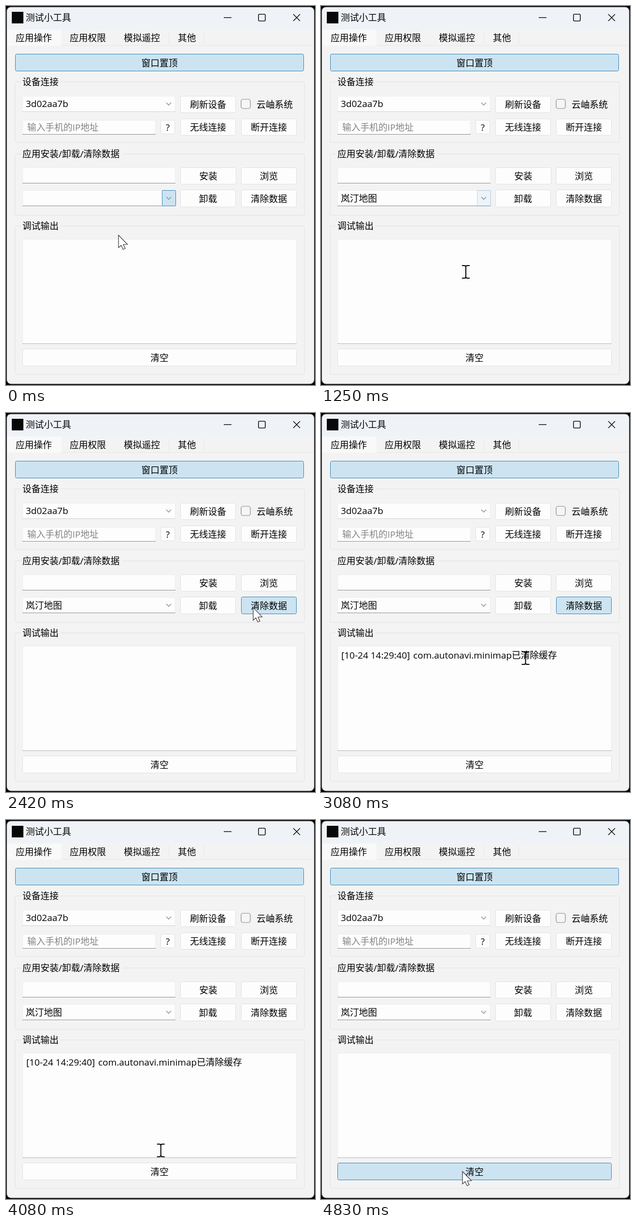
Animation of 640 by 784 pixels, one loop 4910 ms. Source, as an HTML page:

```html
<!DOCTYPE html>
<html lang="zh-CN">
<head>
<meta charset="utf-8">
<title>测试小工具</title>
<style>
  html, body { margin: 0; width: 100%; height: 100%; overflow: hidden; background: #000; }
  svg { display: block; width: 640px; height: 784px; }
  text { font: 18.75px "Open Sans", "Noto Sans CJK SC", "Noto Sans CJK", sans-serif; fill: #000; }
  .latin { font-size: 19px; }
  .mid { text-anchor: middle; }
  .hint { fill: #838383; }
  .line { fill: none; stroke: #111; stroke-width: 1.6; }
  .arrow { fill: none; stroke: #858585; stroke-width: 1.3; }
</style>
</head>
<body>
<svg id="stage" viewBox="0 0 640 784">
  <rect x="1.5" y="2" width="637" height="780" rx="9" fill="#f3f3f3"/>
  <path d="M1.5 48V11q0-9 9-9H629.5q9 0 9 9V48z" fill="#eff3f8"/>
  <rect x="1.5" y="2" width="637" height="780" rx="9" fill="none" stroke="#5c5c5c"/>
</svg>
<script>
const LOOP = 4910, STEP = 250 / 3, FIRST = 500;
const NORMAL = { fill: '#fdfdfd', stroke: '#e0e0e3' };
const HOVER = { fill: '#e0eef9', stroke: '#3a93d0' };
const PRESSED = { fill: '#cce4f2', stroke: '#337fb0' };
const RULE = '#8c8c8c';
const stage = document.getElementById('stage');

function add(tag, attrs, parent = stage) {
  const node = document.createElementNS('http://www.w3.org/2000/svg', tag);
  for (const key in attrs) node.setAttribute(key, attrs[key]);
  return parent.appendChild(node);
}

function label(text, x, middle, cls = '', parent = stage) {
  const node = add('text', { x, y: middle + 7, class: cls }, parent);
  node.textContent = text;
  return node;
}

function box(x, y, right, bottom, look = NORMAL, rx = 3) {
  return add('rect', { x: x + .5, y: y + .5, width: right - x - 1, height: bottom - y - 1, rx, ...look });
}

function button(text, x, y, right, bottom, look) {
  const face = box(x, y, right, bottom, look);
  label(text, (x + right) / 2, (y + bottom) / 2 + .5, 'mid');
  return face;
}

function field(x, y, right, bottom, rule = RULE) {
  box(x, y, right, bottom, { fill: NORMAL.fill, stroke: '#ececee' });
  add('path', { d: `M${x} ${bottom - .5}H${right}`, stroke: rule });
}

const chevron = y => add('path', { d: `M332 ${y}l5 5 5-5`, class: 'arrow' });

function group(title, y, bottom, titleEnd) {
  add('path', {
    d: `M31 ${y}H22q-3 0-3 3V${bottom - 3}q0 3 3 3H615q3 0 3-3V${y + 3}q0-3-3-3H${titleEnd}`,
    fill: 'none', stroke: '#e0e0e5'
  });
  label(title, 34, y);
}

// Title bar and tabs
add('rect', { x: 12, y: 12, width: 24, height: 24, fill: '#080808' });
label('测试小工具', 41, 24);
add('path', { d: 'M451 24H467M595 17l14 14M609 17l-14 14', class: 'line' });
add('rect', { x: 523, y: 17, width: 14, height: 14, rx: 2, class: 'line' });
add('rect', { x: 2, y: 49, width: 113, height: 33, fill: '#f9f9f9' });
add('path', { d: 'M115 81.5H638M337.5 53V78M409.5 53V78', stroke: '#e6e6e9' });
[['应用操作', 20], ['应用权限', 132], ['模拟遥控', 244], ['其他', 356]].forEach(([s, x]) => label(s, x, 66));

button('窗口置顶', 19, 99, 617, 135, PRESSED);

group('设备连接', 157, 282, 113);
field(34, 186, 351, 219, '#d2d2d2');
label('3d02aa7b', 41, 202, 'latin');
chevron(200);
button('刷新设备', 361, 186, 476, 221);
add('rect', { x: 487, y: 193, width: 19, height: 19, rx: 4, fill: '#f6f6f6', stroke: '#858585', 'stroke-width': 1.2 });
label('云岫系统', 519, 204);
field(34, 236, 310, 266);
label('输入手机的IP地址', 44, 251, 'hint');
button('?', 320, 236, 350, 265);
button('无线连接', 361, 233, 476, 268);
button('断开连接', 487, 233, 602, 268);

group('应用安装/卸载/清除数据', 306, 433, 242);
field(34, 334, 351, 367);
button('安装', 361, 334, 477, 369);
button('浏览', 487, 334, 602, 369);
field(34, 381, 351, 414);
const dropFace = box(323, 381, 352, 414, PRESSED, 1);
chevron(395);
const appName = label('岚汀地图', 41, 398);
const caret = add('path', { d: 'M118 387V410', stroke: '#000', 'stroke-width': 1.5 });
button('卸载', 361, 380, 476, 416);
const wipeFace = button('清除数据', 487, 380, 602, 416);

group('调试输出', 455, 762, 113);
field(34, 482, 602, 699, '#b4b4b8');
const log = add('g', {});
label('[10-24 14:29:40]', 42, 501, 'latin', log);
label('com.autonavi.minimap', 191, 501, 'latin', log);
label('已清除缓存', 395, 501, '', log);
const clearFace = button('清空', 34, 709, 602, 745);

const pointer = add('path', {
  d: 'M0 0V26l5.5-5 4 8.5 4.5-2-4-8 8.5-.5z',
  fill: '#fff', stroke: '#333', 'stroke-width': 1.2
});
const beam = add('path', {
  d: 'M-8-13h5q3 0 3 3V10q0 3-3 3h-5M8-13h-5q-3 0-3 3M0 10q0 3 3 3h5',
  fill: 'none', stroke: '#000', 'stroke-width': 2
});

// Tables of [ms, ...values], linear in between
const mousePath = [
  [1080, 233, 474], [1250, 300, 550], [1420, 440, 592], [1580, 512, 545],
  [1830, 503, 437], [2000, 506, 410], [2170, 512, 402], [2920, 512, 404],
  [3000, 490, 428], [3080, 425, 505], [3250, 360, 600], [3500, 332, 643],
  [3750, 314, 697], [4080, 321, 683], [4250, 308, 712], [4420, 295, 732], [4580, 293, 727]
];
const dropHover = [[1080, 1], [1330, 0]];
const wipeHover = [[1830, 0], [2080, 1], [3080, 1], [3330, 0]];
const wipePress = [[2170, 0], [2250, 1]];
const clearHover = [[4170, 0], [4420, 1]];
const clearPress = [[4670, 0], [4750, 1]];

function sample(keys, t) {
  const next = keys.findIndex(key => key[0] > t);
  if (next === 0) return keys[0].slice(1);
  if (next < 0) return keys[keys.length - 1].slice(1);
  const a = keys[next - 1], b = keys[next];
  const k = (t - a[0]) / (b[0] - a[0]);
  return a.slice(1).map((v, i) => v + (b[i + 1] - v) * k);
}

function mix(from, to, k) {
  const part = (hex, i) => parseInt(hex.substr(1 + i * 2, 2), 16);
  return `rgb(${[0, 1, 2].map(i => Math.round(part(from, i) + (part(to, i) - part(from, i)) * k))})`;
}

const show = (node, on) => node.setAttribute('visibility', on ? 'visible' : 'hidden');

function paint(face, hover, press, t) {
  const [h] = sample(hover, t), [p] = sample(press, t);
  const active = p > .5 ? PRESSED : HOVER;
  for (const key in NORMAL) face.setAttribute(key, mix(NORMAL[key], active[key], h));
}

function render(ms) {
  // The picture ticks at twelve frames per second after its opening hold.
  const t = ms < FIRST ? 0 : FIRST + Math.floor((ms + 4 - FIRST) / STEP) * STEP;

  show(appName, t >= 500);
  show(caret, (t >= 500 && t < 1110) || (t >= 1640 && t < 2160));
  show(log, t >= 2999 && t < 4830);

  dropFace.setAttribute('opacity', sample(dropHover, t)[0]);
  paint(wipeFace, wipeHover, wipePress, t);
  paint(clearFace, clearHover, clearPress, t);

  const [x, y] = sample(mousePath, t);
  const overLog = x > 34 && x < 602 && y > 482 && y < 699;
  show(beam, overLog);
  show(pointer, !overLog);
  (overLog ? beam : pointer).setAttribute('transform', `translate(${x.toFixed(1)} ${y.toFixed(1)})`);
}

const start = performance.now();
function tick() {
  render((performance.now() - start) % LOOP);
  requestAnimationFrame(tick);
}
tick();
</script>
</body>
</html>
```
